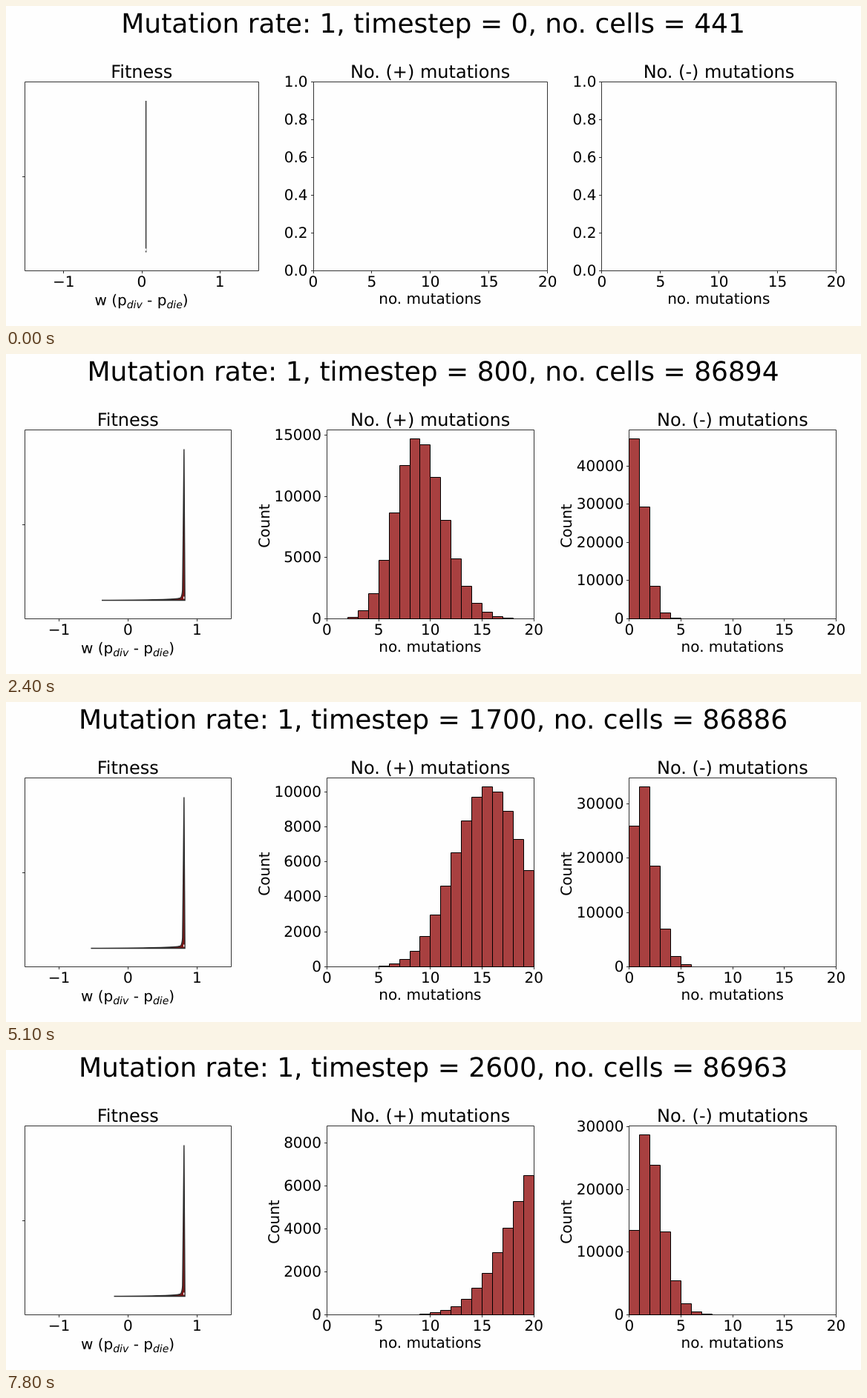
Write an HTML page that moves like this. It is 1152x432 px and loops after 8000 ms.

```html
<!DOCTYPE html>
<html lang="en">
<head>
<meta charset="utf-8">
<title>Mutation histograms</title>
<style>
  html, body { margin: 0; width: 100%; height: 100%; overflow: hidden; background: #fefefe; }
  svg { display: block; font: 20px "DejaVu Sans", sans-serif; text-rendering: geometricPrecision; }
</style>
</head>
<body>
<svg id="plot" width="1152" height="432" viewBox="0 0 1152 432"></svg>
<script>
const svg = document.getElementById("plot");
const TOP = 102.5, BOTTOM = 357.5, HEIGHT = 255, LEFT = 24.7, RIGHT = 1118.1;
const STEP_MS = 300, LOOP_MS = 8000, DIGIT = 12.72;

// Key points: step, number of cells, lowest fitness.
const points = [
  [0, 441, .05], [6, 86906, -.43], [10, 86882, -.335], [14, 86991, -.5],
  [17, 86886, -.54], [22, 86959, -.205], [26, 86963, -.205]
];

function between(k, column) {
  const j = Math.max(1, points.findIndex(p => p[0] >= k));
  const a = points[j - 1], b = points[j];
  return a[column] + (b[column] - a[column]) * (k - a[0]) / (b[0] - a[0]);
}

// Logistic growth up to the plateau.
const cellCount = k => Math.round(k < 6 ? 86906 / (1 + 196.065 * Math.exp(-1.9 * k)) : between(k, 1));

// Normal curve with a skew that fades over time.
function plusShare(k, x) {
  const mean = Math.min(1.18 * k, 2.6 + .75 * k), sd = Math.sqrt(.35 + .65 * k);
  const z = (x - mean) / sd, skew = 2 / Math.max(k, 6);
  return Math.exp(-z * z / 2) / (sd * Math.sqrt(2 * Math.PI)) * (1 + skew / 6 * (z ** 3 - 3 * z));
}

// Poisson tail behind a first mutation with its own rate.
function minusShare(k, x) {
  const first = .22 + .04 * k + .0013 * k * k, rate = .1 + .06 * k;
  let share = 1 / (1 + first * Math.expm1(rate) / rate);
  for (let i = 1; i <= x; i++) share *= i === 1 ? first : rate / i;
  return share;
}

const snap = v => Math.round(v) + .5;

function tickStep(max) {
  for (let p = 1; ; p *= 10)
    for (const s of [1, 2, 2.5, 5]) if (max / (s * p) <= 6 && s * p % 1 === 0) return s * p;
}

function scale(share, k) {
  if (!k) return { bars: [], max: 1, step: .2, digits: 0 };
  const bars = Array.from({ length: 30 }, (_, x) => cellCount(k) * Math.max(0, share(k, x)));
  const max = 1.05 * Math.max(...bars), step = tickStep(max);
  return { bars, max, step, digits: String(Math.floor(max / step) * step).length };
}

const text = (x, y, s, size = 20, anchor = "middle", more = "") =>
  `<text x="${x}" y="${y}" font-size="${size}" text-anchor="${anchor}" ${more}>${s}</text>`;
const line = d => `<path d="${d}" fill="none" stroke="#000" stroke-width=".8"/>`;

function frame(x, w, title) {
  const l = snap(x), r = snap(x + w);
  return line(`M${l} ${TOP}H${r}V${BOTTOM}H${l}Z`) + text(x + w / 2 + .2, 97, title, 24);
}

const xTick = (x, label) => line(`M${snap(x)} ${BOTTOM}v3.5`) + text(x + .4, 379, label);

function fitness(k, w) {
  const px = v => LEFT + (v + 1.5) / 3 * w;
  const u = Math.min(1, k / 6);
  const p = px(.05 + .757 * (1 - (1 - u) ** 2)) + .8, t = px(between(k, 2)) + .5;
  const shape = k
    ? `M${t} 332.5Q${p - 12} 332.3 ${p - 5} 329.5Q${p - 2.5} 327.5 ${p - 2} 318L${p - 1} 230L${p} 128.5L${p + 1.2} 322V332.5Z`
    : `M${p} 128V332.5`;
  const sub = s => `<tspan dy="3.5" font-size="14" font-style="italic">${s}</tspan>`;
  const label = `w (p${sub("div")}<tspan dy="-3.5"> - p</tspan>${sub("die")}<tspan dy="-3.5">)</tspan>`;
  return `<path d="${shape}" fill="#7a1414" stroke="#2d2d2d" stroke-width="1.4"/>`
    + `<rect x="${p - .9}" y="327.5" width="1.4" height="3" fill="#fff"/>`
    + frame(LEFT, w, "Fitness")
    + line(`M${snap(LEFT)} 230.5h-3.5`)
    + [-1, 0, 1].map(v => xTick(px(v), v < 0 ? "−1" : v)).join("")
    + text(LEFT + w / 2, 404, label);
}

function histogram(title, s, x, w) {
  const y = v => snap(357 - v / s.max * HEIGHT);
  let out = "";
  s.bars.slice(0, 20).forEach((n, i) => {
    const a = snap(x + i * w / 20), b = snap(x + (i + 1) * w / 20);
    if (n / s.max * HEIGHT > .7)
      out += `<path d="M${a} ${BOTTOM}V${y(n)}H${b}V${BOTTOM}Z" fill="#a84040" stroke="#000"/>`;
  });
  out += frame(x, w, title);
  for (let v = 0; v <= 20; v += 5) out += xTick(x + v / 20 * w, v);
  for (let i = 0; i * s.step <= s.max + 1e-9; i++) {
    const v = i * s.step;
    out += line(`M${snap(x)} ${y(v)}h-3.5`)
      + text(x - 7, y(v) + 6.5, s.digits ? v : v.toFixed(1), 20, "end");
  }
  out += text(x + w / 2, 402, "no. mutations");
  if (s.digits) {
    const cx = Math.round(x - 13.5 - DIGIT * s.digits);
    out += text(cx, 232, "Count", 20, "middle", `transform="rotate(-90 ${cx} 232)"`);
  }
  return out;
}

function draw(k) {
  const plus = scale(plusShare, k), minus = scale(minusShare, k);
  // The gap makes room for the widest tick labels.
  const gap = k ? 65 + DIGIT * Math.max(plus.digits, minus.digits) : 73.2;
  const w = (RIGHT - LEFT - 2 * gap) / 3, pitch = w + gap;
  svg.innerHTML =
    text(575.6, 36, `Mutation rate: 1, timestep = ${k * 100}, no. cells = ${cellCount(k)}`, 36)
    + fitness(k, w)
    + histogram("No. (+) mutations", plus, LEFT + pitch, w)
    + histogram("No. (-) mutations", minus, LEFT + 2 * pitch, w);
}

let shown = -1;
function tick() {
  const k = Math.floor(performance.now() % LOOP_MS / STEP_MS);
  if (k !== shown) draw(shown = k);
  requestAnimationFrame(tick);
}
tick();
</script>
</body>
</html>
```
